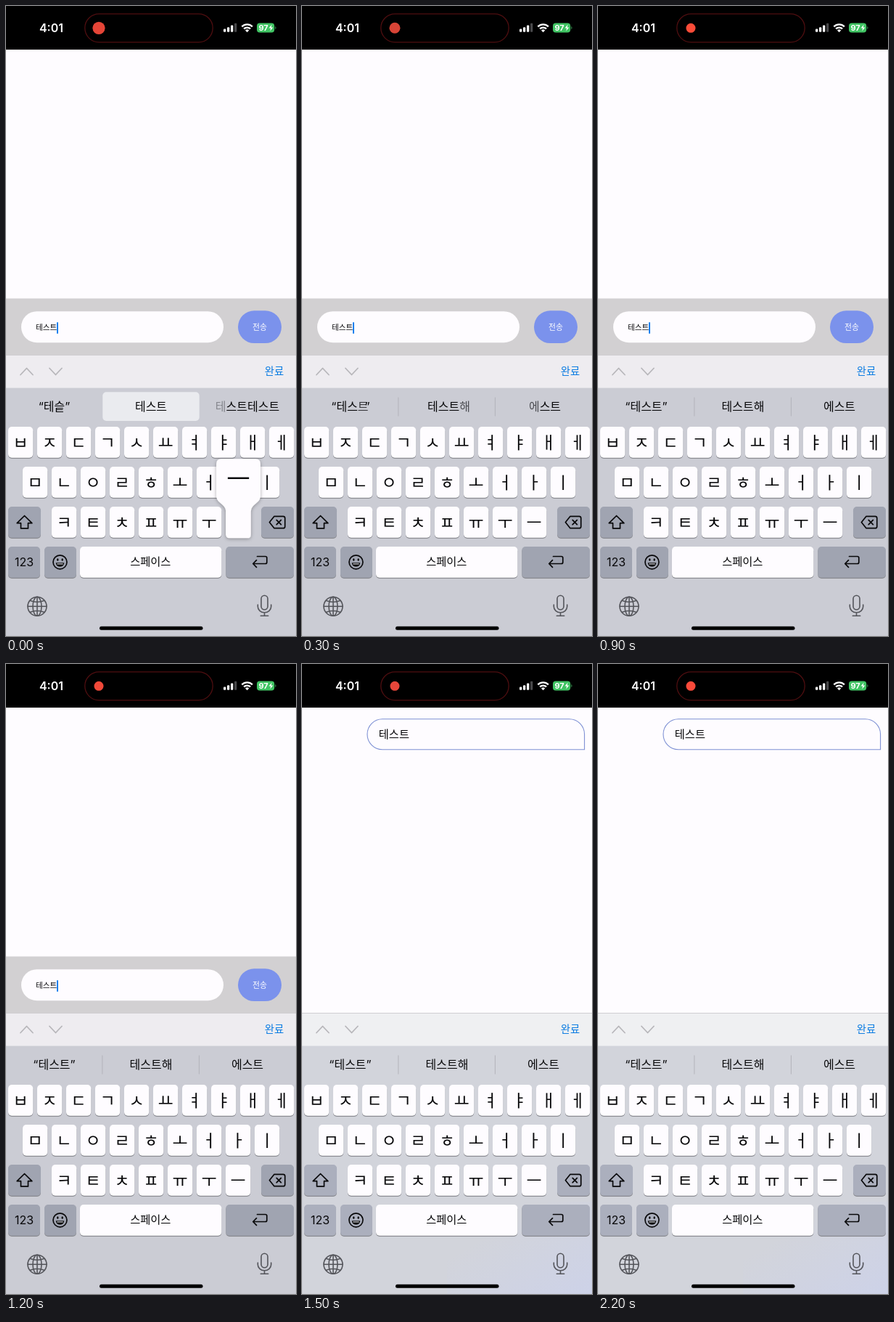
An HTML page that plays this animation: 400 px wide and 867 px high, repeating every 2.3 s.

```html
<!DOCTYPE html>
<html lang="ko">
<head>
<meta charset="utf-8">
<title>Chat input</title>
<style>
  html, body { margin: 0; width: 100%; height: 100%; overflow: hidden; background: #fefcff; }
  svg { display: block; width: 100vw; height: 100vh; }
  text { font-family: Inter, 'Noto Sans CJK KR', 'Noto Sans CJK JP', 'Noto Sans CJK', sans-serif; fill: #08080a; }
  .mid { text-anchor: middle; }
  .word { font-size: 16px; text-anchor: middle; }
  .jamo { font-size: 23px; text-anchor: middle; }
  .line { fill: none; stroke: #08080a; stroke-width: 1.7; stroke-linecap: round; stroke-linejoin: round; }
  .soft { stroke: #54555b; stroke-width: 1.6; }
  .chevron { stroke: #b8b7bb; stroke-width: 1.8; }
  .shade { fill: #8a8b91; }
  .key { fill: #fefcff; }

  /* Scene changes are hard cuts within one 2.3 s loop. */
  .press, .typed, .blend, .settled, .compose, .sent, .board, .bar, .dim, .ghost, .send {
    animation: 2300ms step-end infinite;
  }
  .press { animation-name: press; }
  .typed { animation-name: typed; }
  .blend { animation-name: blend; }
  .settled { animation-name: settled; }
  .compose { animation-name: compose; }
  .sent { animation-name: sent; }
  .board { animation-name: board; }
  .bar { animation-name: bar; }
  .dim { animation-name: dim; }
  .ghost { animation-name: ghost; }
  .send { animation-name: send; }
  .caret { animation: caret 2300ms linear infinite; }
  .dot { animation: dot 2300ms linear infinite; }

  @keyframes press { 0% { visibility: visible } 4.3%, 100% { visibility: hidden } }
  @keyframes typed { 0% { visibility: visible } 13%, 100% { visibility: hidden } }
  @keyframes blend { 0% { visibility: hidden } 13% { visibility: visible } 17.3%, 100% { visibility: hidden } }
  @keyframes settled { 0% { visibility: hidden } 17.3%, 100% { visibility: visible } }
  @keyframes compose { 0% { visibility: visible } 65.2%, 100% { visibility: hidden } }
  @keyframes sent { 0% { visibility: hidden } 65.2%, 100% { visibility: visible } }
  @keyframes board { 0% { fill: #cbccd4 } 65.2%, 100% { fill: #d2d4db } }
  @keyframes bar { 0% { fill: #eeecf0 } 65.2%, 100% { fill: #eff0f2 } }
  @keyframes dim { 0% { fill: #a0a4b1 } 65.2%, 100% { fill: #abafbd } }
  @keyframes ghost { 0% { fill: #85868d } 4.3%, 100% { fill: #08080a } }
  @keyframes send { 0% { fill: #7b92ec } 60.8%, 100% { fill: #758fe6 } }
  @keyframes caret { 0%, 56.5% { opacity: 1 } 60.9% { opacity: .6 } 65.2%, 100% { opacity: .2 } }
  @keyframes dot {
    0% { r: 8.6px; fill: #e54537 }
    4.3% { r: 8.4px; fill: #dc4434 }
    13% { r: 7.5px; fill: #d84436 }
    26% { r: 6.6px; fill: #de4536 }
    39.1% { r: 6.5px; fill: #fb4c38 }
    60.9% { r: 6.5px; fill: #e9473a }
    70% { r: 6.5px; fill: #e2453a }
    95.7%, 100% { r: 6.5px; fill: #fb4a3a }
  }
</style>
</head>
<body>
<svg viewBox="0 0 400 867" preserveAspectRatio="none">
  <defs>
    <linearGradient id="tint" x1="0.35" y1="0.3" x2="1" y2="1">
      <stop offset="0" stop-color="#cdd2e8" stop-opacity="0"/>
      <stop offset="1" stop-color="#cdd2e8"/>
    </linearGradient>
    <filter id="lift" x="-30%" y="-20%" width="160%" height="140%">
      <feDropShadow dx="0" dy="1" stdDeviation="2.5" flood-color="#000" flood-opacity=".32"/>
    </filter>
  </defs>

  <rect width="400" height="867" fill="#fefcff"/>

  <!-- status bar -->
  <rect width="400" height="60"/>
  <rect x="108.8" y="10.8" width="176.4" height="39" rx="19.5" fill="#000" stroke="#4f0e10" stroke-width="1.3"/>
  <circle class="dot" cx="128" cy="30.3" r="8.6"/>
  <text class="mid" x="62.5" y="35.6" font-size="16" font-weight="600" style="fill:#fff">4:01</text>
  <g fill="#fff">
    <rect x="300" y="31.5" width="3.3" height="4.2" rx="1"/>
    <rect x="305" y="29.3" width="3.3" height="6.4" rx="1"/>
    <rect x="310" y="26.5" width="3.3" height="9.2" rx="1"/>
    <rect x="315" y="23.8" width="3.3" height="11.9" rx="1" fill="#48484a"/>
  </g>
  <g fill="none" stroke="#fff" stroke-width="2.3">
    <path d="M325.3 28.4a10.3 10.3 0 0 1 14.6 0"/>
    <path d="M328.1 31.4a6.4 6.4 0 0 1 9 0"/>
  </g>
  <path d="M330 33.6a3.7 3.7 0 0 1 5.2 0l-2.6 2.6z" fill="#fff"/>
  <rect x="346" y="23.4" width="24.2" height="13.2" rx="4" fill="#40c463"/>
  <path d="M371.2 28v4q1.4-.5 1.4-2t-1.4-2z" fill="#2c7a41"/>
  <text x="348.4" y="34" font-size="11" font-weight="700" style="fill:#fff">97</text>
  <path d="M366.6 25.6l-4 5h2.6l-1 4 4.2-5.2h-2.7z" fill="#fff"/>

  <!-- sent message -->
  <g class="sent">
    <path d="M111 75.8H368.6a21 21 0 0 1 21 21V117.8H111a21 21 0 0 1 0-42z" fill="#fefcff" stroke="#7e90d4" stroke-width="1.1"/>
    <text x="105.8" y="101.6" font-size="15.3">테스트</text>
  </g>

  <!-- composer -->
  <g class="compose">
    <rect y="402.5" width="400" height="78" fill="#d2d0d2"/>
    <rect x="21" y="420.2" width="279" height="43" rx="21.5" fill="#fefcff"/>
    <text x="41" y="446.4" font-size="10.6">테스트</text>
    <rect class="caret" x="70" y="435.3" width="2" height="15.5" fill="#1480ee"/>
    <rect class="send" x="320" y="419.3" width="60" height="44.8" rx="22.4"/>
    <text class="mid" x="350" y="445.7" font-size="10.8" style="fill:#fff">전송</text>
  </g>

  <!-- toolbar -->
  <rect class="bar" y="480" width="400" height="45.5"/>
  <rect y="480" width="400" height="1" fill="#cfced2"/>
  <path class="line chevron" d="M20 507.5l8.5-9 8.5 9M60 498.5l8.5 9 8.5-9"/>
  <text class="mid" x="370" y="508.4" font-size="14.4" font-weight="500" style="fill:#0a7be2">완료</text>

  <!-- keyboard -->
  <rect class="board" y="525.5" width="400" height="341.5"/>
  <rect class="sent" x="200" y="740" width="200" height="127" fill="url(#tint)"/>

  <g class="typed">
    <rect x="133.3" y="531.3" width="133.4" height="39.7" rx="5" fill="#eaebef"/>
    <text class="word" x="66.5" y="557">“테슽”</text>
    <text class="word" x="200" y="557">테스트</text>
    <text class="word" x="333" y="557"><tspan class="ghost">테</tspan>스트테스트</text>
  </g>
  <g class="blend">
    <text class="word" x="67" y="557">“테스<tspan fill="#3a3a3e">트</tspan><tspan dx="-5">”</tspan></text>
    <text class="word" x="202.5" y="557">테스트<tspan style="fill:#4c4d52">해</tspan></text>
    <text class="word" x="335" y="557"><tspan style="fill:#4c4d52">에</tspan>스트</text>
  </g>
  <g class="settled">
    <text class="word" x="66.5" y="557">“테스트”</text>
    <text class="word" x="200" y="557">테스트해</text>
    <text class="word" x="333" y="557">에스트</text>
  </g>
  <g fill="#b3b4bb">
    <g class="blend"><path d="M132.4 538.5h1v26h-1zM265.9 538.5h1v26h-1z"/></g>
    <g class="settled"><path d="M132.4 538.5h1v26h-1zM265.9 538.5h1v26h-1z"/></g>
  </g>

  <g id="keys"></g>

  <path class="line" d="M25.5 701.5l-10.3 10.2h5.3v7.2h10v-7.2h5.3z"/>
  <path class="line" d="M370 702.3h12.3q2.5 0 2.5 2.5v11.4q0 2.5-2.5 2.5H370l-6.6-8.2zM373.2 707.3l6.2 6.4M379.4 707.3l-6.2 6.4"/>
  <path class="line" d="M346.5 757.5h11.3q2 0 2 2v6q0 2-2 2H341M345.5 762.7l-4.8 4.8 4.8 4.8"/>
  <circle class="line" cx="74.5" cy="765.3" r="9.5"/>
  <ellipse cx="71.3" cy="762" rx="1.2" ry="1.7"/>
  <ellipse cx="77.7" cy="762" rx="1.2" ry="1.7"/>
  <path d="M68.7 766.2h11.6q-.8 5.4-5.8 5.4t-5.8-5.4z"/>
  <path d="M70.3 767.2h8.4v1.3h-8.4z" fill="#c9cad0"/>
  <text class="mid" x="25" y="771.2" font-size="16">123</text>
  <text class="mid" x="199.3" y="769.6" font-size="15.3">스페이스</text>

  <g class="line soft">
    <circle cx="43" cy="826.3" r="13"/>
    <ellipse cx="43" cy="826.3" rx="6" ry="13"/>
    <path d="M43 813.3v26M30 826.3h26M33.3 818.3q9.7 4 19.4 0M33.3 834.3q9.7-4 19.4 0"/>
    <rect x="352" y="811.3" width="9" height="19.5" rx="4.5"/>
    <path d="M347.3 824v2.5a9.2 8.2 0 0 0 18.4 0V824M356.5 834.8v4.3M351.3 839.2h10.4"/>
  </g>
  <rect x="129" y="853.8" width="142.5" height="5" rx="2.5"/>

  <!-- pressed key -->
  <g class="press">
    <path d="M297 623.3h47q7 0 7 7V674q0 5-4 8.5l-5 4.5q-4.2 3.5-4.2 9V727.5q0 5-5 5H308.300q-5 0-5-5V696q0-5.500-4.200-9l-5-4.500q-4-3.500-4-8.500V630.300q0-7 7-7z" fill="#fefcff" filter="url(#lift)"/>
    <text class="mid" x="320.600" y="664" font-size="36">ㅡ</text>
  </g>
</svg>
<script>
  const keys = document.getElementById('keys');

  function add(tag, attrs, text) {
    const node = document.createElementNS('http://www.w3.org/2000/svg', tag);
    for (const name in attrs) node.setAttribute(name, attrs[name]);
    if (text) node.textContent = text;
    keys.append(node);
  }

  function addKey(x, y, width, kind) {
    const box = { x, width, height: 42.8, rx: 5 };
    add('rect', { ...box, y: y + 1.2, class: 'shade' });
    add('rect', { ...box, y, class: kind });
  }

  const rows = [
    [3, 579, 'ㅂㅈㄷㄱㅅㅛㅕㅑㅐㅔ'],
    [23, 634, 'ㅁㄴㅇㄹㅎㅗㅓㅏㅣ'],
    [63, 689, 'ㅋㅌㅊㅍㅠㅜㅡ']
  ];
  for (const [left, y, letters] of rows) {
    [...letters].forEach((letter, i) => {
      const x = left + i * 40;
      addKey(x, y, 34.2, 'key');
      add('text', { x: x + 17.1, y: y + 30, class: 'jamo' }, letter);
    });
  }

  addKey(3, 689, 45, 'dim');
  addKey(352, 689, 45, 'dim');
  addKey(3, 744, 44, 'dim');
  addKey(53, 744, 44, 'dim');
  addKey(102, 744, 195.3, 'key');
  addKey(303.3, 744, 93.7, 'dim');
</script>
</body>
</html>
```
